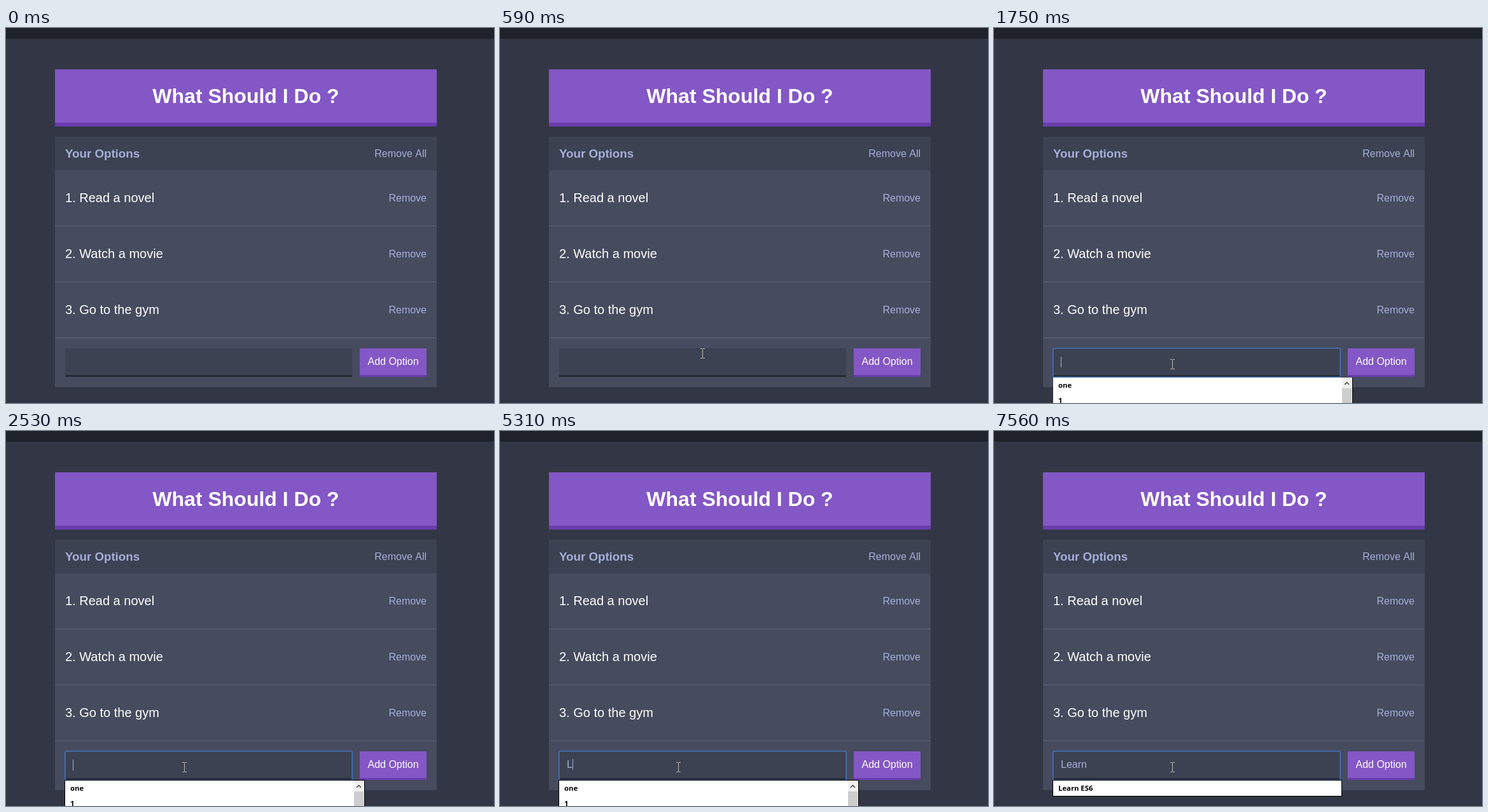
These frames come from a looping animation (767x590 px, 8000 ms). An HTML page with a canvas:

```html
<!DOCTYPE html>
<html lang="en">
<head>
<meta charset="utf-8">
<title>What Should I Do ?</title>
<style>
  html, body { margin: 0; width: 100%; height: 100%; overflow: hidden; background: #333745; }
  canvas { display: block; }
</style>
</head>
<body>
<canvas id="stage" width="767" height="590"></canvas>
<script>
const ctx = document.getElementById('stage').getContext('2d');
const LOOP = 8000;
const SANS = '"Liberation Sans", Arial, sans-serif';
const LIST = '"Open Sans", "Noto Sans", sans-serif';
const C = {
  bar: '#20222b', page: '#333745', panel: '#464b5e', field: '#3c4251', fieldEdge: '#262a34',
  line: '#5f647b', purple: '#8357c5', purpleEdge: '#693cad', soft: '#a5afd9',
  ring: '#4672bf', beam: '#c3bdae'
};

const OPTIONS = ['Read a novel', 'Watch a movie', 'Go to the gym'];

// Mouse path: time, x, y of the hot spot
const PATH = [
  [70, 658, 572], [200, 570, 440], [330, 460, 366], [460, 385, 420],
  [590, 318, 512], [740, 280, 551], [820, 271, 556], [900, 268, 552],
  [975, 275, 541], [1050, 278, 534], [1125, 280, 530], [1200, 280, 529]
];

// Typed text: time, value
const TYPED = [[0, ''], [5310, 'L'], [5540, 'Le'], [5770, 'Lea'], [6000, 'Lear'], [6700, 'Learn'], [7010, 'Learn ']];

// The caret flips at each of these times, starting hidden
const CARET = [1750, 1990, 2530, 3080, 3630, 4090, 4640, 5140, 5310, 6550, 6700, 7560];

function box(color, x, y, w, h) {
  ctx.fillStyle = color;
  ctx.fillRect(x, y, w, h);
}

function text(str, x, y, size, color, align = 'left', weight = 'normal', family = SANS) {
  ctx.font = `${weight} ${size}px ${family}`;
  ctx.textAlign = align;
  ctx.fillStyle = color;
  ctx.fillText(str, x, y);
}

function drawPage() {
  box(C.page, 0, 0, 767, 590);
  box(C.bar, 0, 0, 767, 17);

  box(C.purple, 77, 65, 600, 84);
  box(C.purpleEdge, 77, 149, 600, 6);
  text('What Should I Do ?', 377, 118, 32, '#fff', 'center', 'bold');

  box(C.panel, 77, 171, 600, 394);
  box(C.field, 77, 171, 600, 53);
  text('Your Options', 93, 204, 18.72, C.soft, 'left', 'bold');
  text('Remove All', 661, 203, 16, C.soft, 'right');

  OPTIONS.forEach((name, i) => {
    const y = 224 + i * 88;
    text(`${i + 1}. ${name}`, 93, y + 50, 20, '#fff');
    text('Remove', 661, y + 49, 16, C.soft, 'right');
    box(C.line, 77, y + 87, 600, 1);
  });

  box(C.field, 93, 504, 451, 42);
  box(C.fieldEdge, 93, 546, 451, 3);
  box(C.purple, 556, 504, 105, 42);
  box(C.purpleEdge, 556, 546, 105, 3);
  text('Add Option', 608.5, 530, 16, '#fff', 'center');
}

function drawField(t) {
  ctx.strokeStyle = C.ring;
  ctx.lineWidth = 1.6;
  ctx.beginPath();
  ctx.roundRect(92.8, 503.8, 451.4, 45.4, 1.5);
  ctx.stroke();

  const value = TYPED.filter(k => k[0] <= t).pop()[1];
  text(value, 105, 530, 16, C.soft);
  if (CARET.filter(k => k <= t).length % 2) {
    const x = Math.round(105 + ctx.measureText(value).width);
    box(C.soft, x, value ? 516 : 517, 1, 17);
  }
}

function drawScrollbar() {
  box('#f0f0f0', 547, 550, 16, 40);
  box('#cdcdcd', 547, 567, 15, 23);
  ctx.strokeStyle = '#404040';
  ctx.lineWidth = 1.5;
  ctx.beginPath();
  ctx.moveTo(551, 561);
  ctx.lineTo(554.5, 557.5);
  ctx.lineTo(558, 561);
  ctx.stroke();
}

function drawList(t) {
  const all = t < 5400;
  const rows = all ? ['one', '1'] : t < 5770 ? ['Learn ES6', 'Lesson'] : ['Learn ES6'];
  const right = all ? 564 : 547;
  const h = rows.length * 24 + 2;
  if (t >= 1910) box('#000', 92, 549, right - 92, h);
  else box('#000', 563, 550, 1, h);
  box('#fff', 93, 550, right - 94, h - 2);
  if (all) drawScrollbar();
  rows.forEach((row, i) => text(row, 101, 566 + i * 24, 11.3, '#000', 'left', 'bold', LIST));
}

function drawBeam(x, y) {
  for (const dy of [-8, 7]) {
    box(C.beam, x - 3, y + dy, 3, 1);
    box(C.beam, x + 1, y + dy, 3, 1);
  }
  box(C.beam, x, y - 7, 1, 14);
}

function drawArrow(x, y) {
  const pts = [[0, 0], [0, 16], [4, 12.5], [6.5, 18], [8.5, 17], [6.2, 11.5], [11.5, 11.5]];
  ctx.beginPath();
  pts.forEach(([px, py]) => ctx.lineTo(x + px + 0.5, y + py + 0.5));
  ctx.closePath();
  ctx.fillStyle = '#fff';
  ctx.fill();
  ctx.strokeStyle = '#000';
  ctx.lineWidth = 1;
  ctx.stroke();
}

// The pointer is sampled in small steps, as by a screen recorder
function sampleTime(t) {
  if (t < 590) return 70 + Math.floor((t - 70) / 65) * 65;
  if (t < 660) return 590;
  if (t < 900) return 660 + Math.floor((t - 660) / 80) * 80;
  return Math.min(1200, 900 + Math.floor((t - 900) / 75) * 75);
}

function drawMouse(t) {
  if (t < 70) return;
  const s = sampleTime(t);
  const i = Math.min(PATH.length - 2, PATH.findLastIndex(p => p[0] <= s));
  const [t0, x0, y0] = PATH[i], [t1, x1, y1] = PATH[i + 1];
  const k = (s - t0) / (t1 - t0);
  const x = Math.round(x0 + (x1 - x0) * k), y = Math.round(y0 + (y1 - y0) * k);
  const inField = x >= 93 && x < 544 && y >= 504 && y < 549;
  (inField ? drawBeam : drawArrow)(x, y);
}

function frame(now) {
  const t = now % LOOP;
  drawPage();
  if (t >= 1750) {
    drawField(t);
    drawList(t);
  }
  drawMouse(t);
  requestAnimationFrame(() => frame(performance.now() - start));
}

const start = performance.now();
frame(0);
</script>
</body>
</html>
```
